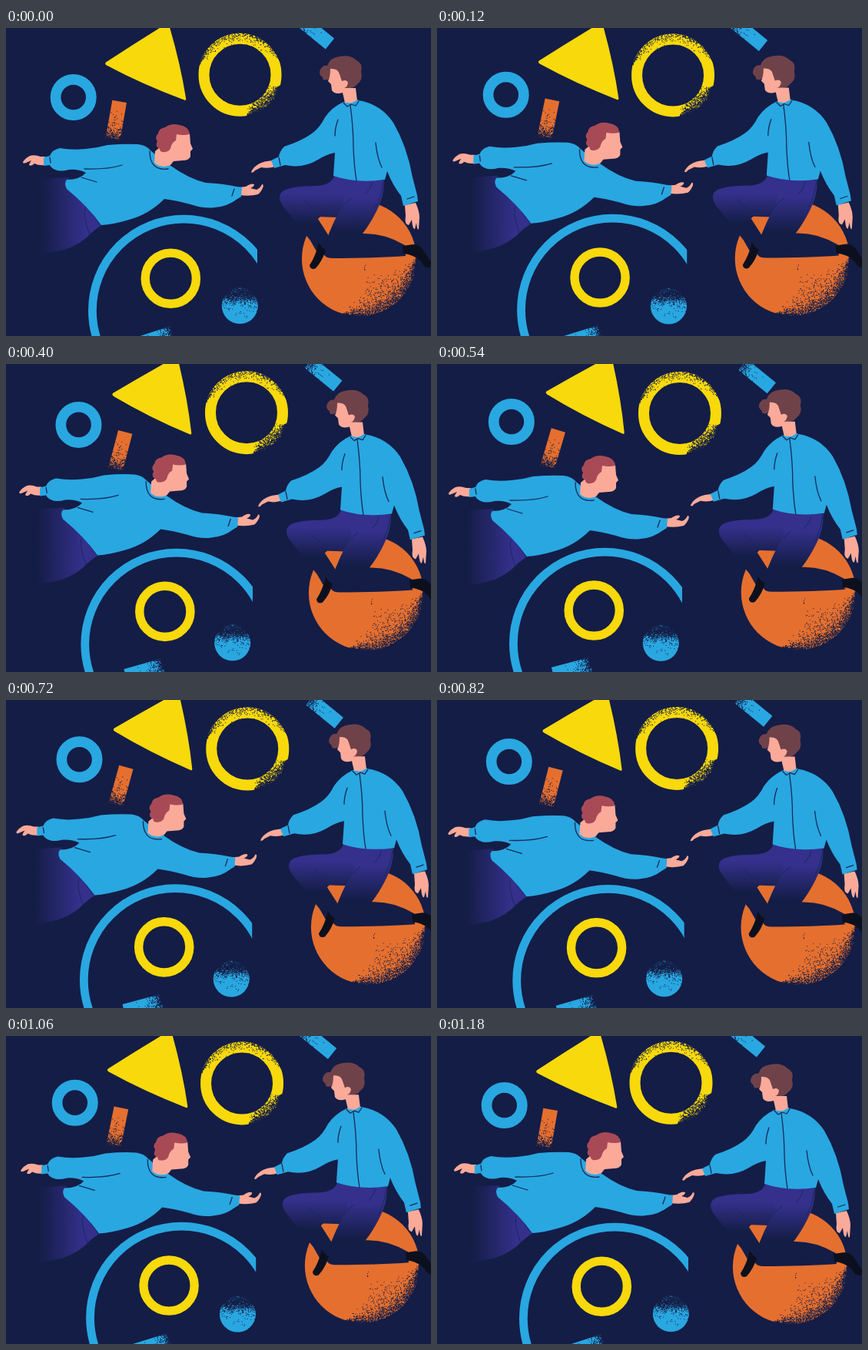
Write an HTML page with a canvas that moves like this. It is 553 px wide and 400 px high and loops after 1200 ms.

```html
<!DOCTYPE html>
<html lang="en">
<head>
<meta charset="utf-8">
<title>Floating figures</title>
<style>
  html, body { margin: 0; width: 100%; height: 100%; overflow: hidden; background: #141d46; }
  canvas { display: block; }
</style>
</head>
<body>
<canvas id="stage" width="553" height="400"></canvas>
<script>
const ctx = document.getElementById('stage').getContext('2d');
const LOOP = 1200, STEP = 20, TURN = 590, TAU = Math.PI * 2;
const C = {
  bg: '#141d46', blue: '#29a7e1', yellow: '#f8d90b', orange: '#e56f2f', skin: '#fbaa99',
  redHair: '#a84a56', brownHair: '#6f424a', purple: '#34308c', shoe: '#0c101e', line: '#152b59'
};

let seed = 7;
const rnd = () => (seed = (seed * 16807) % 2147483647) / 2147483647;
const decay = scale => -Math.log(rnd()) * scale;
const rad = deg => deg * Math.PI / 180;
const polar = (r, deg) => [r * Math.cos(rad(deg)), r * Math.sin(rad(deg))];

// Scatter of pixel-sized specks; place() returns one position
function grain(count, place) {
  const path = new Path2D();
  for (let i = 0; i < count; i++) {
    const [x, y] = place();
    path.rect(x, y, 1, 1);
  }
  return path;
}
// Specks eating into a circle's rim, deepest halfway along the arc
const rimGrain = (count, r, from, to, depth) => grain(count, () => {
  const s = rnd();
  return polar(r - decay(depth * Math.sin(Math.PI * s)), from + (to - from) * s);
});

const specks = {
  ringTop: rimGrain(480, 54.5, -165, -20, 4.5),
  ringGap: rimGrain(1300, 54.5, 14, 82, 8),
  ball: rimGrain(1900, 75, -2, 108, 10),
  smallBall: grain(1900, () => [-24 + 48 * rnd(), -25 + 10 * rnd() + decay(4.5)]),
  brick: grain(330, () => [-10 + 20 * rnd(), 25 - decay(7)]),
  slab: grain(360, () => [25 - decay(6), -1 + 24 * rnd()]),
  chip: grain(130, () => [-24 + decay(6), -9 + 18 * rnd()])
};

function fill(shape, color) {
  ctx.fillStyle = color;
  ctx.fill(typeof shape === 'string' ? new Path2D(shape) : shape);
}
function lines(d, width = 1.3) {
  ctx.strokeStyle = C.line;
  ctx.lineWidth = width;
  ctx.stroke(new Path2D(d));
}
function disc(r, color) {
  ctx.beginPath();
  ctx.arc(0, 0, r, 0, TAU);
  ctx.fillStyle = color;
  ctx.fill();
}
function ring(outer, inner, color) {
  ctx.beginPath();
  ctx.arc(0, 0, (outer + inner) / 2, 0, TAU);
  ctx.lineWidth = outer - inner;
  ctx.strokeStyle = color;
  ctx.stroke();
}
function box(x, y, w, h, color) {
  ctx.fillStyle = color;
  ctx.fillRect(x, y, w, h);
}
function at(x, y, deg, draw) {
  ctx.save();
  ctx.translate(x, y);
  ctx.rotate(rad(deg));
  draw();
  ctx.restore();
}
function fade(x0, y0, x1, y1, from, to) {
  const g = ctx.createLinearGradient(x0, y0, x1, y1);
  g.addColorStop(0, from);
  g.addColorStop(1, to);
  return g;
}

// Smooth path through [time, x, y] keys
function follow(keys, t) {
  let i = 0;
  while (i < keys.length - 2 && t > keys[i + 1][0]) i++;
  const a = keys[i], b = keys[i + 1], span = b[0] - a[0], p = (t - a[0]) / span;
  const slope = (k, axis) => {
    const l = keys[Math.max(k - 1, 0)], r = keys[Math.min(k + 1, keys.length - 1)];
    return (r[axis] - l[axis]) / (r[0] - l[0]) * span;
  };
  return [1, 2].map(axis =>
    a[axis] * (1 + 2 * p) * (1 - p) ** 2 + b[axis] * p * p * (3 - 2 * p) +
    slope(i, axis) * p * (1 - p) ** 2 - slope(i + 1, axis) * p * p * (1 - p));
}
const leftKeys = [[0, 0, 0], [120, -1.6, -2.2], [280, -3.2, -5.8], [410, -5, -7.6],
  [540, -7, -6], [720, -8.6, -2.4], [920, -5.8, .5], [1180, 0, 0]];
const rightKeys = [[0, 0, 0], [120, 2.8, -.5], [280, 7, -1.7], [540, 10.8, -3.2],
  [720, 12, -4.8], [920, 8.2, -3.6], [1180, 0, 0]];

function shapes(u) {
  at(87.7 + 10 * u, 90 - 16.4 * u, 0, () => ring(30, 16.3, C.blue));

  at(190 + 13.6 * u, 44.6 - 6 * u, 3.8 * u, () =>
    fill('M-60 0Q-62 2-59 4Q-12 29 42 49Q45 50 44 46Q37 2 22-49Q20-52 17-49Q-22-25-60 0Z', C.yellow));

  at(143.3 + 8.2 * u, 120 - 11 * u, 10 + 7 * u, () => {
    box(-9.5, -25, 19, 50, C.orange);
    fill(specks.brick, C.bg);
  });

  at(304.5 + 12.5 * u, 60.7 + 3.6 * u, 0, () => {
    ring(54, 40, C.yellow);
    fill(specks.ringTop, C.bg);
    fill(specks.ringGap, C.bg);
  });

  at(402.8 + 15.2 * u, 5.4 + 11.8 * u, 39, () => {
    box(-24, -9, 48, 18, C.blue);
    fill(specks.chip, C.bg);
  });

  ctx.save();
  ctx.beginPath();
  ctx.rect(0, 200, 327 - 8.7 * u, 200);
  ctx.clip();
  at(231.3 - 14.2 * u, 367 - 4.4 * u, 0, () => ring(124.3, 113.5, C.blue));
  ctx.restore();

  at(214.3 - 11 * u, 325.2 - 5.6 * u, 0, () => ring(38.8, 27.4, C.yellow));

  at(304.3 - 14.2 * u, 360.8 + 1.9 * u, 0, () => {
    disc(23.5, C.blue);
    fill(specks.smallBall, C.bg);
  });

  at(190 - 18.5 * u, 395 - 8 * u, -18 + 3.5 * u, () => {
    box(-25, 0, 50, 22, C.blue);
    fill(specks.slab, C.bg);
  });
}

function flyingMan() {
  fill('M45 196L80 194L126 255Q112 264 105 272Q88 286 68 290L45 294Z',
    fade(46, 0, 104, 0, C.bg, C.purple));
  lines('M90 214Q106 232 123 256M103 234Q100 245 109 269', 1);

  // hands
  fill('M51 167L45 167Q37 164 31 166Q25 169 22 174Q22 177 26 175L33 172Q30 176 30 178Q33 180 37 176Q43 179 51 178Z', C.skin);
  fill('M303 207L312 206Q319 201 323 203Q323 206 318 208L326 210Q331 208 333 203Q336 203 334 208Q331 214 328 216Q318 219 303 217Z', C.skin);

  fill('M49 168L57 166Q60 158 70 156Q86 159 104 157Q118 156 132 152Q154 150 172 151Q182 152 188 159' +
    'L194 164L213 178Q238 196 260 201Q282 202 300 206L307 207L306 219L301 222' +
    'Q288 232 272 233Q258 235 240 229Q222 224 206 222Q186 242 160 249Q140 255 124 256' +
    'Q106 231 79 209Q75 201 79 197Q96 197 104 188Q94 183 82 184Q70 187 64 184Q59 182 57 178L49 179Z', C.blue);

  // neck and face
  fill('M194 160L222 137L239 137L240 150L243 157L240 160L240 167Q238 172 230 172L218 173L214 178Q202 183 193 175Z', C.skin);
  fill('M207 161Q200 162 200 157Q193 154 197 147Q193 142 198 137Q199 130 207 129Q215 123 226 126Q238 128 239 138' +
    'Q231 140 222 138L221 146Q217 148 215 153Q214 160 207 161Z', C.redHair);

  lines('M187 160Q187 186 211 183M102 183Q132 184 151 178M98 194L118 200M57 168L58 175M297 209L294 218');
}

function sittingMan() {
  at(459.5, 299.7, 0, () => {
    disc(74.6, C.orange);
    fill(specks.ball, C.bg);
  });

  fill('M427 192Q424 203 406 205Q370 205 360 212Q352 219 360 231L396 276L404 290L414 292L420 270L404 245L432 246L460 198Z',
    fade(0, 215, 0, 254, C.purple, C.bg));
  fill('M440 194L492 198Q492 220 482 238Q474 254 464 267Q492 266 519 282L520 296Q480 299 425 299Q408 299 415 281Q424 254 440 226Z',
    fade(0, 220, 0, 265, C.purple, C.bg));
  lines('M388 224Q400 236 410 239M449 221Q436 231 430 242M491 200Q488 222 480 234M476 201Q475 209 467 216', 1);

  // shoes
  fill('M407 279Q411 286 416 288Q412 302 403 312Q396 315 395 308Q403 296 407 279Z', C.shoe);
  fill('M516 283L530 281Q539 281 544 290L553 304L552 311Q545 313 540 303Q530 294 517 293Z', C.shoe);

  // hands
  fill('M347 172Q335 173 330 176Q322 180 319 187Q321 189 324 185L332 181Q341 183 350 180Z', C.skin);
  fill('M519 230L533 227Q538 238 538 246L537 261Q535 264 534 253L532 261Q529 262 528 249L524 256Q518 255 520 244Z', C.skin);

  fill('M439 96Q424 103 415 116Q408 130 398 137Q384 147 362 154Q356 160 355 167L345 172L349 182L363 178' +
    'Q386 183 406 171Q417 164 428 162L426 192Q455 202 493 197L496 186Q503 204 514 218L517 231L536 225L535 217L529 194' +
    'Q522 154 504 123Q488 99 459 94Z', C.blue);

  // head
  fill('M419 67Q411 69 412 64Q406 60 409 54Q412 48 418 49Q422 38 434 37Q448 34 456 42Q465 46 462 57' +
    'Q465 67 457 73Q452 80 441 78L424 64Z', C.brownHair);
  fill('M422 53Q432 52 434 60L437 69Q443 66 445 71Q444 77 440 78L455 78L457 95Q449 99 441 97L438 84Q428 87 424 81L423 73L419 69Q422 64 422 53Z', C.skin);

  fill('M439 96L449 98L458 93L459 99L455 102L449 99L444 102Z', C.blue);
  lines('M439 97L444 102L449 99L455 101L459 95M448 100Q452 130 452 155Q453 180 456 198M432 119Q428 130 428 140M481 149Q483 169 489 181' +
    'M355 168L357 178M522 222L531 219');
}

function draw(t) {
  const u = 1 - Math.abs(1 - t / TURN);
  box(0, 0, 553, 400, C.bg);
  ctx.lineCap = ctx.lineJoin = 'round';
  shapes(u);
  at(...follow(leftKeys, t), 0, flyingMan);
  at(...follow(rightKeys, t), 0, sittingMan);
}

const start = performance.now();
function tick() {
  const t = (performance.now() - start) % LOOP;
  draw(Math.floor(t / STEP) * STEP);
  requestAnimationFrame(tick);
}
tick();
</script>
</body>
</html>
```
